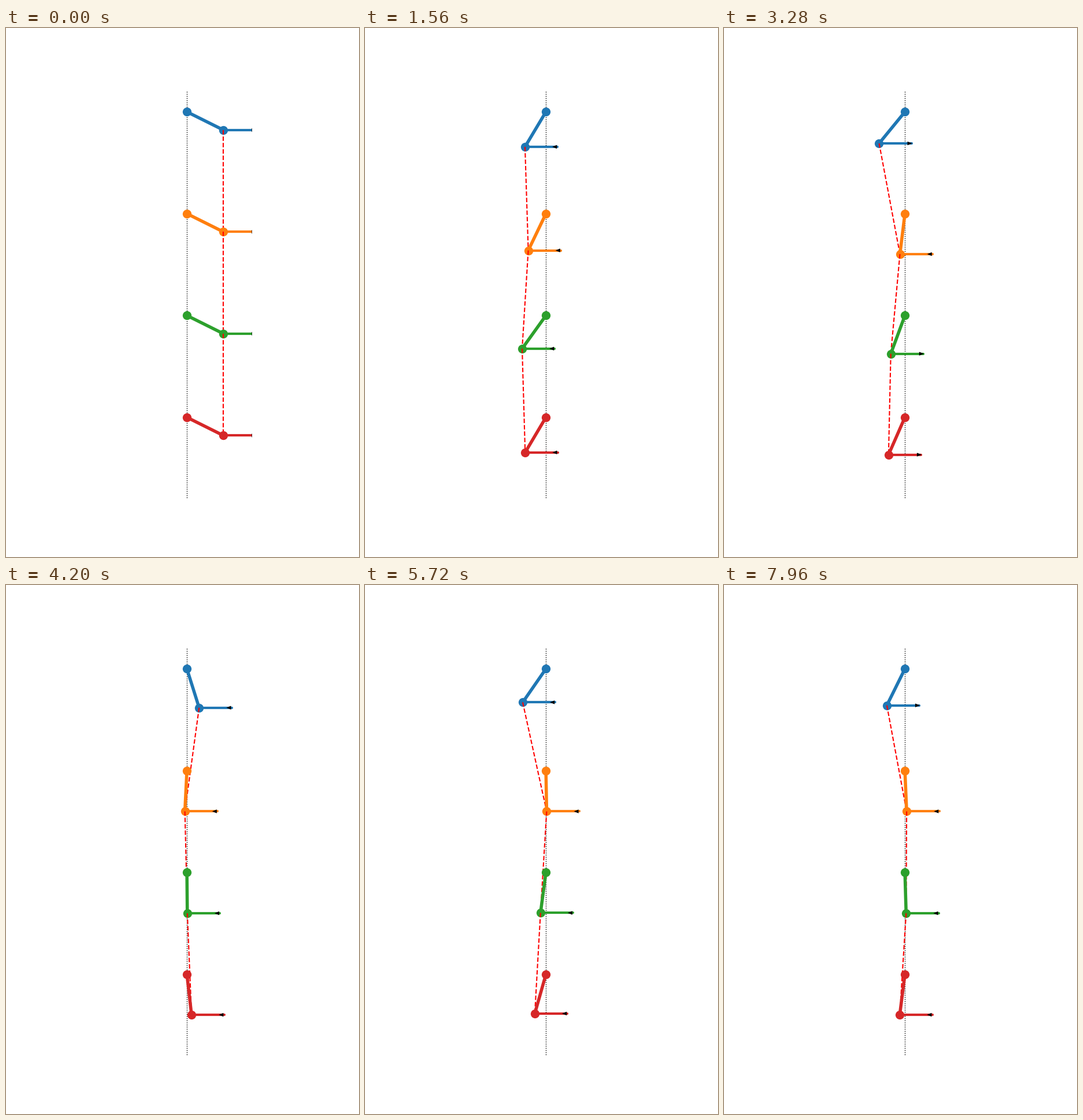
Animation of 611x917 px, one loop 8000 ms. Source, as a matplotlib script:

```python
import numpy as np
import matplotlib.pyplot as plt
from matplotlib.animation import FuncAnimation
from matplotlib.patches import Polygon

W, H, DPI = 611, 917, 100
FRAMES, STEP = 200, 40
GAP = 2.5          # distance between pivots, in rod lengths
ARM = 0.8          # length of the horizontal arm
COLORS = ["tab:blue", "tab:orange", "tab:green", "tab:red"]

# Turning points of each pendulum: times in s, swing in degrees
TURNS = [
    ([0, 1.203, 2.35, 3.47, 4.615, 5.718, 6.9, 8.0],
     [63.5, 57.7, 50, 44.7, 39.9, 34.7, 31, 26.3]),
    ([0, 1.32, 2.37, 3.7, 4.98, 6.7, 8.0],
     [63.5, 40, 19.7, 10.5, 6, 3.55, 2.4]),
    ([0, 1.294, 2.38, 3.58, 4.8, 6.1, 8.0],
     [63.5, 54, 38.2, 26, 18, 10.8, 1.65]),
    ([0, 1.24, 2.42, 3.54, 4.675, 5.7, 6.82, 7.94, 9.05],
     [63.5, 50, 38.1, 30, 23, 16, 8.7, 7.3, 6]),
]


def swing(i, t):
    """Angle in radians and the direction of the friction arrow."""
    times, sizes = TURNS[i]
    half_turns = np.interp(t, times, np.arange(len(times)))
    size = np.exp(np.interp(t, times, np.log(sizes)))
    angle = np.radians(size) * np.cos(np.pi * half_turns)
    falling_left = int(half_turns) % 2 == 0 and size > 15
    return angle, 1 if falling_left else -1


def arrow_head(x, y, side):
    tip, base = (0.81, 0.695) if side > 0 else (0.668, 0.782)
    return [(x + tip, y), (x + base, y - 0.046), (x + base, y + 0.046)]


fig = plt.figure(figsize=(W / DPI, H / DPI), dpi=DPI, facecolor="white")
width = 0.77 * H * 0.32 / W
ax = fig.add_axes([0.5125 - width / 2, 0.11, width, 0.77])
ax.set_xlim(-1.6, 1.6)
ax.set_ylim(9.5, -0.5)
ax.axis("off")
ax.plot([0, 0], [-0.5, 9.5], ":", color="black", lw=1, zorder=1)

rods, arms, heads, links = [], [], [], []
for i, color in enumerate(COLORS):
    z = 2 + 4 * i
    rods += ax.plot([], [], "o-", color=color, lw=4, ms=10, zorder=z)
    arms += ax.plot([], [], color=color, lw=3, zorder=z + 1,
                    solid_capstyle="round")
    heads.append(ax.add_patch(Polygon([(0, 0)] * 3, color="black", lw=0,
                                      zorder=z + 2)))
    if i < len(COLORS) - 1:
        links += ax.plot([], [], "--", color="red", lw=1.5, zorder=z + 3)


def draw(frame):
    t = frame * STEP / 1000
    bobs = []
    for i in range(len(COLORS)):
        angle, side = swing(i, t)
        x, y = np.sin(angle), GAP * i + np.cos(angle)
        rods[i].set_data([0, x], [GAP * i, y])
        arms[i].set_data([x, x + ARM], [y, y])
        heads[i].set_xy(arrow_head(x, y, side))
        bobs.append((x, y))
    for link, a, b in zip(links, bobs, bobs[1:]):
        link.set_data([a[0], b[0]], [a[1], b[1]])
    return rods + arms + heads + links


anim = FuncAnimation(fig, draw, frames=FRAMES, interval=STEP, repeat=True,
                     repeat_delay=0, blit=False)
plt.show()
```
